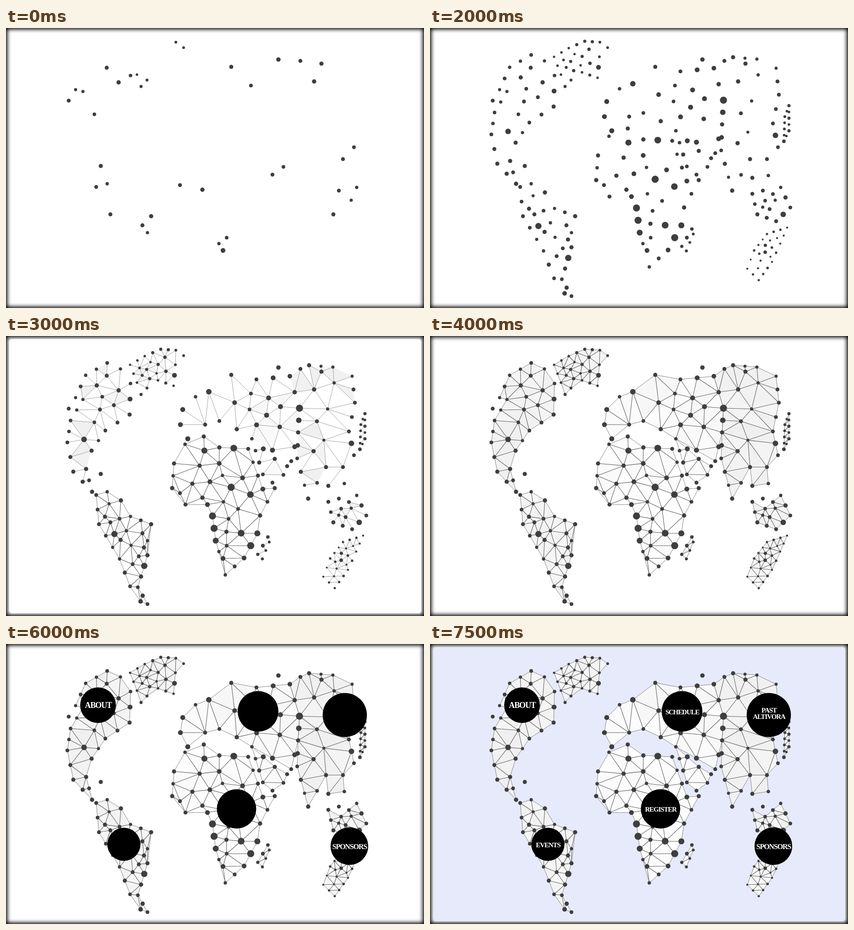
Recreate the animation shown at these times as an HTML page. Size 913x613 px, loop 8000 ms.

```html
<!DOCTYPE html>
<html lang="en">
<head>
<meta charset="utf-8">
<title>World network map</title>
<style>
  html, body { margin: 0; width: 100%; height: 100%; overflow: hidden; background: #fff; }
  #stage { position: relative; width: 913px; height: 613px; overflow: hidden; }
  #stage > * { position: absolute; }
  #edge { inset: 0; box-shadow: inset 0 0 9px 3px #000; }
  .panel { left: 7px; top: 7px; width: 900px; height: 600px; border-radius: 6px; }
  #plain { background: #fff; }
  #tinted { background: #e7eafa; }
  svg { left: 0; top: 0; }
  text { font: bold 15px "Liberation Serif", "Noto Serif", serif; letter-spacing: -1.1px;
         fill: #fff; text-anchor: middle; }
</style>
</head>
<body>
<div id="stage">
  <div id="edge"></div>
  <div id="plain" class="panel"></div>
  <div id="tinted" class="panel"></div>
  <svg id="map" width="913" height="613" viewBox="0 0 913 613"></svg>
</div>
<script>
const STEP = 500, STEPS = 16;
const map = document.getElementById('map');
const timed = [];

// An element is visible from step `from` until step `to`.
function show(el, from, to = STEPS) {
  timed.push({ el, from, to });
}
function add(parent, tag, attrs = {}) {
  const el = document.createElementNS(map.namespaceURI, tag);
  for (const k in attrs) el.setAttribute(k, attrs[k]);
  return parent.appendChild(el);
}
const [fills, lines, dots, menu] = Array.from({ length: 4 }, () => add(map, 'g'));

let seed = 7;
function random() {
  seed = (seed * 1664525 + 1013904223) % 4294967296;
  return seed / 4294967296;
}

const dist = (a, b) => Math.hypot(a.x - b.x, a.y - b.y);
const nearest = (p, pts) => Math.min(...pts.map(q => dist(p, q)));

function pairs(v) {
  const out = [];
  for (let i = 0; i < v.length; i += 2) out.push({ x: v[i], y: v[i + 1] });
  return out;
}

function inside(p, poly) {
  let hit = false;
  poly.forEach((a, i) => {
    const b = poly[(i + 1) % poly.length];
    if (a.y > p.y !== b.y > p.y && p.x < a.x + (b.x - a.x) * (p.y - a.y) / (b.y - a.y)) hit = !hit;
  });
  return hit;
}

// Evenly spaced points along the outline.
function walk(poly, gap) {
  return poly.flatMap((a, i) => {
    const b = poly[(i + 1) % poly.length], n = Math.max(1, Math.round(dist(a, b) / gap));
    return Array.from({ length: n }, (_, k) =>
      ({ x: a.x + (b.x - a.x) * k / n, y: a.y + (b.y - a.y) * k / n }));
  });
}

// Adds the best of some random points: the one farthest from its neighbours.
function scatter(pts, poly, count) {
  const xs = poly.map(p => p.x), ys = poly.map(p => p.y);
  const pick = v => Math.min(...v) + random() * (Math.max(...v) - Math.min(...v));
  while (count-- > 0) {
    const tries = Array.from({ length: 80 }, () => ({ x: pick(xs), y: pick(ys) }))
      .filter(p => inside(p, poly))
      .sort((a, b) => nearest(b, pts) - nearest(a, pts));
    if (tries.length) pts.push(tries[0]);
  }
}

function circum(a, b, c) {
  const bx = b.x - a.x, by = b.y - a.y, cx = c.x - a.x, cy = c.y - a.y;
  const d = 2 * (bx * cy - by * cx);
  if (Math.abs(d) < 1e-6) return null;
  const p = bx * bx + by * by, q = cx * cx + cy * cy;
  const x = (cy * p - by * q) / d, y = (bx * q - cx * p) / d;
  return { x: a.x + x, y: a.y + y, r: Math.hypot(x, y) };
}

// Delaunay triangles with their centre on land.
function triangles(pts, poly) {
  const out = [], n = pts.length;
  for (let i = 0; i < n; i++)
    for (let j = i + 1; j < n; j++)
      for (let k = j + 1; k < n; k++) {
        const a = pts[i], b = pts[j], c = pts[k], o = circum(a, b, c);
        const mid = { x: (a.x + b.x + c.x) / 3, y: (a.y + b.y + c.y) / 3 };
        if (o && inside(mid, poly) && pts.every(p => dist(p, o) > o.r - 1e-6)) out.push([i, j, k]);
      }
  return out;
}

// Inner edges come first and thin, the full net with its coast follows.
function mesh(pts, poly, tone, thinAt, fullAt) {
  const edges = new Map();
  const at = i => `${pts[i].x.toFixed(1)} ${pts[i].y.toFixed(1)}`;
  for (const [i, j, k] of triangles(pts, poly)) {
    const shade = tone - Math.floor(random() * 6);
    const d = `M${at(i)}L${at(j)}L${at(k)}Z`;
    show(add(fills, 'path', { d, fill: `rgb(${shade},${shade},${shade})` }), random() < 0.2 ? 6 : 7);
    for (const [p, q] of [[i, j], [j, k], [i, k]]) {
      const key = `M${at(p)}L${at(q)}`;
      edges.set(key, (edges.get(key) || 0) + 1);
    }
  }
  const draw = (keep, width, stroke, from, to) => {
    const d = [...edges.keys()].filter(e => keep(edges.get(e))).join('');
    show(add(lines, 'path', { d, fill: 'none', stroke, 'stroke-width': width }), from, to);
  };
  draw(n => n > 1, 0.8, '#8a8a8a', thinAt, fullAt);
  draw(n => n > 1, 1.1, '#606060', fullAt);
  draw(n => n === 1, 0.9, '#777', fullAt);
}

// `open` dots start the loop; coast and inner dots follow in random order.
function land({ coast, open = [], gap, inner = 0, size = 4, tone = 253, thinAt = 6, fullAt = 7 }) {
  const poly = pairs(coast), pts = pairs(open), opening = pts.length;
  for (const p of walk(poly, gap))
    if (!pts.length || nearest(p, pts) > gap * 0.3) pts.push(p);
  scatter(pts, poly, inner);
  pts.forEach((p, i) => {
    const big = i >= opening && random() < 0.14 ? 1.5 : 1;
    const r = size * big * (0.8 + 0.4 * random());
    const step = i < opening ? 0 : 1 + Math.floor(random() * 4);
    show(add(dots, 'circle', { cx: p.x, cy: p.y, r, fill: '#3e3e3f' }), step);
  });
  mesh(pts, poly, tone, thinAt, fullAt);
}

const lands = {
  greenland: {
    coast: [271,63, 303,44, 338,29, 371,31, 388,43, 370,63, 366,109, 332,97, 295,128, 286,102],
    open: [371,31, 388,43, 286,102, 308,114, 295,128],
    gap: 22, inner: 9, size: 3.2, tone: 246
  },
  northAmerica: {
    coast: [174,86, 221,59, 250,72, 272,104, 270,172, 217,207, 187,251, 175,291, 188,341,
            147,297, 134,233, 141,185, 168,139, 152,135],
    open: [220,87, 246,119, 272,104, 152,135, 168,139, 137,159, 193,189, 207,302],
    gap: 32, inner: 5, tone: 245
  },
  southAmerica: {
    coast: [197,348, 221,341, 251,360, 272,395, 317,412, 309,480, 288,550, 309,587, 294,581,
            271,548, 248,488, 203,412],
    open: [197,348, 221,341, 228,408, 317,412, 298,432, 309,448],
    gap: 28, inner: 10, tone: 247, thinAt: 5, fullAt: 6
  },
  europe: {
    coast: [381,194, 386,161, 414,133, 443,122, 492,85, 547,95, 620,88, 641,158, 638,211,
            623,274, 582,250, 537,225, 504,204, 466,186, 435,194, 397,225],
    open: [492,85, 535,126, 595,69],
    gap: 42, inner: 7, size: 4.6, tone: 252
  },
  asia: {
    coast: [620,88, 662,64, 714,68, 756,88, 762,146, 749,209, 760,261, 736,287, 739,323,
            704,328, 699,287, 660,356, 636,268, 638,211, 641,158],
    open: [643,72, 689,78, 673,117, 760,261, 736,287],
    gap: 34, inner: 5, tone: 245
  },
  japan: { coast: [784,170, 784,225, 773,248, 775,194], gap: 15, size: 3.2 },
  africa: {
    coast: [391,237, 432,220, 466,244, 529,247, 561,335, 587,333, 555,393, 549,432, 520,486,
            479,523, 458,448, 451,394, 440,369, 392,369, 363,333, 367,279],
    open: [380,344, 429,354, 482,459, 465,472, 474,487],
    gap: 34, inner: 14, size: 4.4, tone: 255, thinAt: 5, fullAt: 6
  },
  arabia: {
    coast: [537,225, 587,269, 614,285, 582,321, 561,303],
    open: [606,304, 582,321],
    gap: 32, tone: 255
  },
  madagascar: { coast: [572,440, 575,451, 560,488, 550,478], gap: 20, size: 3.4 },
  islands: {
    coast: [704,363, 732,378, 766,349, 787,393, 756,423, 715,408],
    open: [727,356, 766,349, 754,377, 715,408],
    gap: 25, inner: 2, tone: 246
  },
  south: {
    coast: [780,437, 765,472, 747,512, 718,552, 693,527, 708,487, 736,451],
    gap: 18, inner: 9, size: 2.4, tone: 249
  }
};
Object.values(lands).forEach(land);

// x, y, radius, disc step, label step, font size, lines of text
const buttons = [
  [201, 134, 39, 9, 12, 18, 'ABOUT'],
  [750, 442.5, 41.2, 9, 12, 16, 'SPONSORS'],
  [550.5, 147.5, 44.5, 10, 14, 15, 'SCHEDULE'],
  [503.5, 361, 43, 10, 13, 15, 'REGISTER'],
  [740, 155.5, 48.3, 11, 13, 15, 'PAST', 'ALTIVORA'],
  [257.5, 438.5, 36.2, 11, 14, 15, 'EVENTS']
];
for (const [x, y, r, discAt, textAt, size, ...words] of buttons) {
  show(add(menu, 'circle', { cx: x, cy: y, r }), discAt);
  words.forEach((word, i) => {
    const base = words.length > 1 ? y - 5.5 + i * 14 : y + 6;
    const label = add(menu, 'text', { x: x + 0.5, y: base, style: `font-size:${size}px` });
    label.textContent = word;
    show(label, textAt);
  });
}

const edge = document.getElementById('edge');
show(edge, 0, 5);
show(edge, 6);
show(document.getElementById('plain'), 6, 8);
show(document.getElementById('tinted'), 15);

const start = performance.now();
let last = -1;
function frame() {
  const step = Math.floor((performance.now() - start) / STEP) % STEPS;
  if (step !== last) {
    last = step;
    const on = new Map();
    for (const { el, from, to } of timed)
      on.set(el, on.get(el) || (step >= from && step < to));
    on.forEach((visible, el) => { el.style.display = visible ? '' : 'none'; });
  }
  requestAnimationFrame(frame);
}
frame();
</script>
</body>
</html>
```
